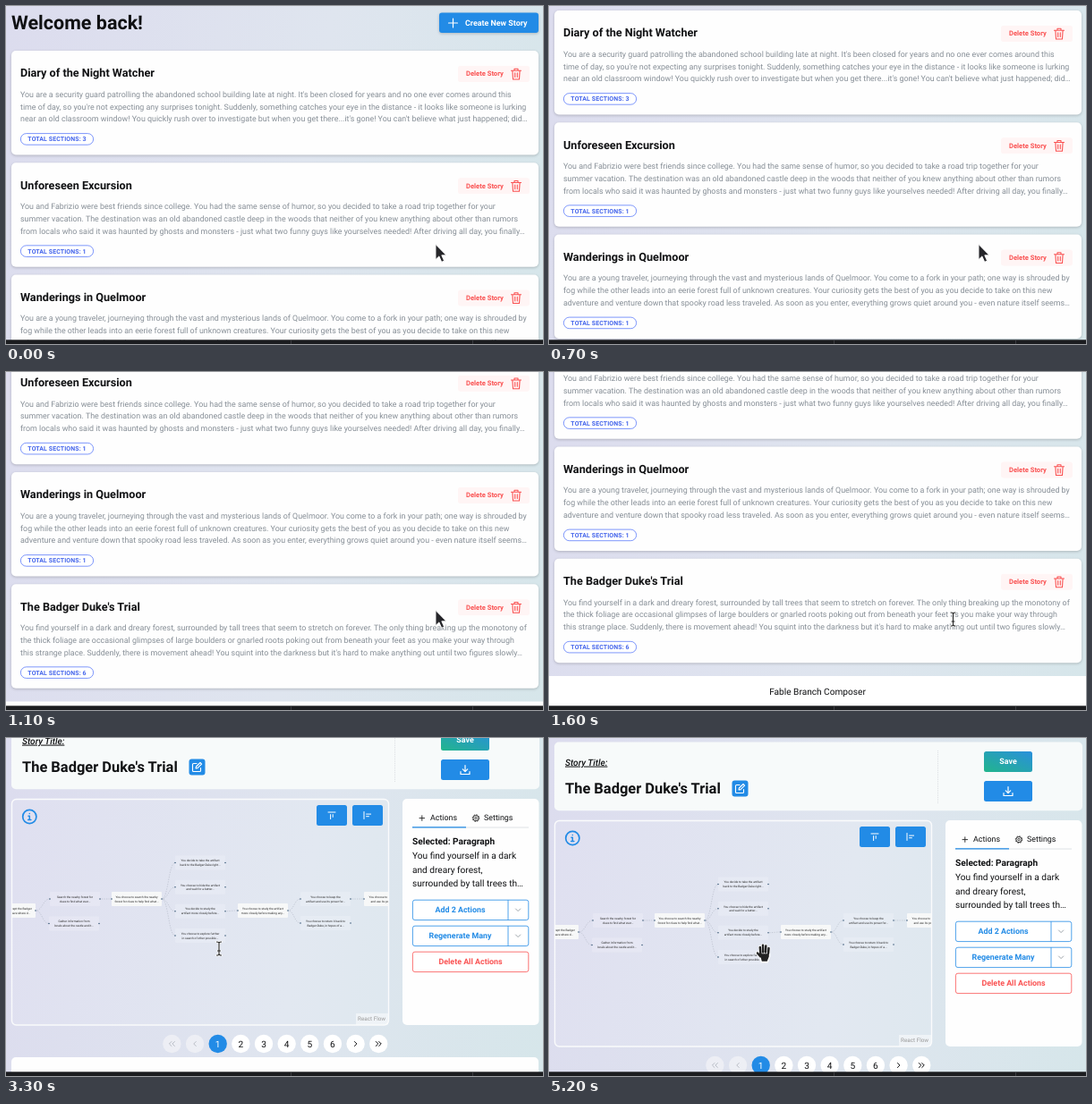
Write an HTML page that moves like this. It is 600 px wide and 378 px high and loops after 5300 ms.

```html
<!DOCTYPE html>
<html lang="en">
<head>
<meta charset="utf-8">
<title>Story editor</title>
<style>
html, body { margin: 0; width: 100%; height: 100%; overflow: hidden; }
svg { display: block; background: linear-gradient(100deg, #dcdcee, #dfe5ef 55%, #d6e6ea); }
text { font-family: Roboto, Arial, sans-serif; text-rendering: geometricPrecision; white-space: pre; }
.shadow { filter: drop-shadow(0 1px 1.5px #0003); }
.line { fill: none; stroke-linecap: round; stroke-linejoin: round; }
.bold { font-weight: 700; }
.mid { text-anchor: middle; }
.italic { font-style: italic; }
#edges { fill: none; stroke: #a0a6b4; stroke-width: .45; stroke-dasharray: 1.35; }
</style>
</head>
<body>
<svg width="600" height="378">
  <clipPath id="pane"><rect x="7" y="93" width="420" height="251"/></clipPath>
  <g id="list"></g>
  <g id="story"></g>
  <rect y="373.3" width="600" height="5" fill="#1b1c1f"/>
  <path d="M318.5 374v4M521.5 374v4" stroke="#3a3b3f"/>
  <g id="cursor"></g>
</svg>
<script>
const BLUE = '#228be6', RED = '#fa5252', GREY = '#868e96', INK = '#101113';
const SMALL = 8.88, BODY = 10.15;
const $ = id => document.getElementById(id);

// y is the middle of the capitals
const text = (x, y, s, size, cls = '', fill = INK, extra = '') =>
  `<text x="${x}" y="${y + size * .355}" font-size="${size}" class="${cls}" fill="${fill}" ${extra}>${s}</text>`;
const lines = (x, y, rows, size, pitch, fill, cls) =>
  rows.map((s, i) => text(x, y + i * pitch, s, size, cls, fill)).join('');
const rect = (x, y, w, h, r, fill, extra = '') =>
  `<rect x="${x}" y="${y}" width="${w}" height="${h}" rx="${r}" fill="${fill}" ${extra}/>`;
const icon = (x, y, d, color, width = 1.1) =>
  `<path class="line" transform="translate(${x} ${y})" d="${d}" stroke="${color}" stroke-width="${width}"/>`;

const TRASH = 'M0 2.5h11M3.5 2.5v-2h4v2M1.4 2.5l.6 9.8h7l.6-9.8M4.2 5v4.7M6.8 5v4.7';
const EDIT = 'M5 1.5H1.5a1 1 0 0 0-1 1v7a1 1 0 0 0 1 1h7a1 1 0 0 0 1-1V6.5M4 7l.4-2L9 .5l1.6 1.6L6 6.6z';

const stories = [
  ['Diary of the Night Watcher', 3,
    "You are a security guard patrolling the abandoned school building late at night. It's been closed for years and no one ever comes around this",
    "time of day, so you're not expecting any surprises tonight. Suddenly, something catches your eye in the distance - it looks like someone is lurking",
    "near an old classroom window! You quickly rush over to investigate but when you get there...it's gone! You can't believe what just happened; did…"],
  ['Unforeseen Excursion', 1,
    'You and Fabrizio were best friends since college. You had the same sense of humor, so you decided to take a road trip together for your',
    'summer vacation. The destination was an old abandoned castle deep in the woods that neither of you knew anything about other than rumors',
    'from locals who said it was haunted by ghosts and monsters - just what two funny guys like yourselves needed! After driving all day, you finally…'],
  ['Wanderings in Quelmoor', 1,
    'You are a young traveler, journeying through the vast and mysterious lands of Quelmoor. You come to a fork in your path; one way is shrouded by',
    'fog while the other leads into an eerie forest full of unknown creatures. Your curiosity gets the best of you as you decide to take on this new',
    'adventure and venture down that spooky road less traveled. As soon as you enter, everything grows quiet around you - even nature itself seems…'],
  ["The Badger Duke's Trial", 6,
    'You find yourself in a dark and dreary forest, surrounded by tall trees that seem to stretch on forever. The only thing breaking up the monotony of',
    'the thick foliage are occasional glimpses of large boulders or gnarled roots poking out from beneath your feet as you make your way through',
    "this strange place. Suddenly, there is movement ahead! You squint into the darkness but it's hard to make anything out until two figures slowly…"]
];

const card = ([title, count, ...rows], i) => `<g transform="translate(0 ${50 + i * 125.25})">
  ${rect(6, 0, 589, 116.5, 5, '#fefefe', 'class="shadow"')}
  ${text(16, 25, title, 12.66, 'bold')}
  ${rect(505, 17, 80, 18, 3, '#fff5f5')}
  ${text(514, 25.8, 'Delete Story', 7.6, 'bold', RED)}
  ${icon(564.5, 19.7, TRASH, RED)}
  ${lines(16, 48.6, rows, SMALL, 13.75, GREY)}
  ${rect(16.4, 92.6, 81.2, 12.6, 6.3, '#fff', 'stroke="#5c7cfa" stroke-width=".8"')}
  ${text(57, 98.9, 'TOTAL SECTIONS: ' + count, 6.95, 'bold mid', '#4263eb', 'letter-spacing=".12"')}</g>`;

$('list').innerHTML = text(6, 18.7, 'Welcome back!', 21.5, 'bold') +
  rect(484, 7.5, 111, 22.5, 3, BLUE, 'class="shadow"') +
  icon(494.5, 14, 'M0 5h10M5 0v10', '#fff', 1.2) +
  text(513, 18.6, 'Create New Story', SMALL, 'bold', '#fff') +
  stories.map(card).join('') +
  rect(0, 557, 600, 40, 0, '#fff') +
  text(300, 574.8, 'Fable Branch Composer', BODY, 'mid');

// centre x, centre y, two rows, white box
const nodes = [
  [5, 217, 'You choose to accept the Badger', 'Duke offer and leave where d...', 1],
  [77, 204, 'Search the nearby forest for', 'clues to find what ever...'],
  [76, 231.5, 'Gather information from', 'locals about the castle and it...'],
  [146, 204, 'You choose to search the nearby', 'forest for clues to help find what...', 1],
  [217, 163.5, 'You decide to take the artifact', 'back to the Badger-Duke right...'],
  [217, 190.8, 'You choose to hide the artifact', 'and wait for a better...'],
  [217, 217.7, 'You decide to study the', 'artifact more closely before...'],
  [217, 245, 'You choose to explore further', 'in search of other possible...'],
  [287, 217, 'You choose to study the artifact', 'more closely before making any...', 1],
  [357, 204, 'You choose to keep the', 'artifact and use its power for...'],
  [357, 231, 'You choose to return it back to', 'Badger-Duke, in hopes of a...'],
  [428, 204, 'You choose to keep the artifact', 'and use its power for good...', 1]
];
const links = [[0, 1], [0, 2], [1, 3], [3, 4], [3, 5], [3, 6], [3, 7], [6, 8], [8, 9], [8, 10], [9, 11]];
const HALF = 28;

const node = ([x, y, a, b, boxed]) =>
  rect(x - HALF, y - 8, 2 * HALF, 16, 1, boxed ? '#f7f8f8' : '#ffffff2c') +
  lines(x, y - 2.4, [a, b], 3.25, 4.9, '#222', 'mid') +
  [-HALF, HALF].map(d => `<circle cx="${x + d}" cy="${y}" r=".8" fill="#3f5f7c"/>`).join('');
const link = ([from, to]) => {
  const [ax, ay] = nodes[from], [bx, by] = nodes[to];
  const x1 = ax + HALF, x2 = bx - HALF, m = (x1 + x2) / 2;
  return `<path d="M${x1} ${ay}C${m} ${ay} ${m} ${by} ${x2} ${by}"/>`;
};

const splitButton = (y, label) =>
  rect(454.4, y, 129.4, 22.4, 2.5, '#fff', `stroke="${BLUE}" stroke-width=".8"`) +
  `<path d="M561 ${y}v22.4" stroke="${BLUE}" stroke-width=".8"/>` +
  text(507.5, y + 11.1, label, SMALL, 'bold mid', BLUE) +
  icon(569.5, y + 9.8, 'M0 0l2.6 2.6L5.2 0', GREY, .8);

const pages = ['«', '‹', 1, 2, 3, 4, 5, 6, '›', '»'];
const chevrons = {
  '«': 'M-.5-2.5L-3 0l2.5 2.5M3-2.5L.5 0 3 2.5', '‹': 'M1.2-2.5L-1.3 0l2.5 2.5',
  '›': 'M-1.2-2.5L1.3 0l-2.5 2.5', '»': 'M.5-2.5L3 0 .5 2.5M-3-2.5L-.5 0-3 2.5'
};
const pageDot = (p, i) => {
  const x = 185.4 + i * 25.65, on = p === 1, off = i < 2;
  return `<circle cx="${x}" cy="366" r="10.2" fill="${on ? BLUE : off ? '#f4f5f8aa' : '#fff'}"/>` +
    (chevrons[p] ? icon(x, 366, chevrons[p], off ? '#b9bec6' : INK, 1)
      : text(x, 366.1, p, BODY, 'mid', on ? '#fff' : INK));
};

const paragraph = [
  'You find yourself in a dark and dreary forest, surrounded by tall trees that seem to stretch on forever. The only thing',
  'breaking up the monotony of the thick foliage are occasional glimpses of large boulders or gnarled roots poking out',
  'from beneath your feet as you make your way through this strange place. Suddenly, there is movement ahead! You',
  "squint into the darkness but it's hard to make anything out until two figures slowly emerge from behind a bush –",
  "goblins! They're short and green with sharp teeth bared menacingly at you, ready for battle if need be. But before",
  'either one makes any move towards aggression they pause... then bow low in respect? It takes some time for it all',
  "sink in; these goblins aren't here to fight - instead they've been sent by their king who has heard about your legendary",
  'bravery and seeks an audience with you immediately. After exchanging words (and more bows) between yourselves',
  'an agreement is made: If successful completion of his task can be achieved he will reward generously indeed... With',
  'no other option available than to venture on towards an unknown peril, you set off without hesitation deeper'
];

const header = rect(6, 4.5, 590, 76.8, 5, '#f7fafa') +
  text(18, 27, 'Story Title:', BODY, 'italic', INK, 'font-weight="500" text-decoration="underline"') +
  text(18, 56.3, stories[3][0], 16.46, 'bold') +
  rect(204.5, 47.5, 18, 18, 3, BLUE) + icon(208, 51, EDIT, '#fff') +
  '<path d="M434.5 14v60" stroke="#d5d9dd" stroke-width=".8" stroke-dasharray="1 1"/>' +
  '<linearGradient id="save" x1="0" y1="1" x2="1" y2="0"><stop stop-color="#22b58c"/><stop offset="1" stop-color="#2a8fdc"/></linearGradient>' +
  rect(486, 15, 54, 23, 2.5, 'url(#save)') + text(513, 26.2, 'Save', SMALL, 'bold mid', '#fff') +
  rect(486, 48, 54, 23, 2.5, BLUE) +
  icon(508, 54.7, 'M0 7v2.8h10V7M5 0v6.8M2.3 4.2L5 6.9l2.7-2.7', '#fff', 1.2);

const graph = rect(6.5, 92.5, 421, 252.5, 5, '#ffffff18', 'stroke="#fafbfc" stroke-width="1.4"') +
  `<g clip-path="url(#pane)"><g id="edges">${links.map(link).join('')}</g>${nodes.map(node).join('')}</g>` +
  `<circle cx="26.3" cy="112" r="7.6" fill="none" stroke="${BLUE}" stroke-width="1.7"/>` +
  icon(26.3, 112, 'M0-3.6v.1M-1.3-.8H0v4M-1.6 3.4h3.2', BLUE, 1.5) +
  rect(347, 99, 34, 23, 2.5, BLUE) + icon(360, 107, 'M0 0h8M2.6 2.6v5M5.2 2.6v2.8', '#fff', 1) +
  rect(387, 99, 34, 23, 2.5, BLUE) + icon(400, 106.5, 'M0 0v8M2.6 2.6h5M2.6 5.2h2.8', '#fff', 1) +
  rect(391, 332, 36, 12.5, 0, '#ffffff80') + text(393, 338.2, 'React Flow', 6.33, '', '#999');

const cog = '<circle cx="525" cy="113.6" r="3.1" fill="none" stroke="#222" stroke-width=".9"/>' +
  '<circle cx="525" cy="113.6" r="1.2" fill="none" stroke="#222" stroke-width=".8"/>' +
  '<circle cx="525" cy="113.6" r="3.8" fill="none" stroke="#222" stroke-width=".9" stroke-dasharray="1.49"/>';
const panel = rect(443, 92, 152.5, 253, 5, '#fefefe') +
  icon(462, 110.8, 'M0 2.8h5.6M2.8 0v5.6', '#222', .9) + text(474, 113.3, 'Actions', SMALL) +
  cog + text(534, 113.3, 'Settings', SMALL) +
  `<path d="M454 124h130" stroke="#dee2e6"/><path d="M454 123.8h60" stroke="${BLUE}" stroke-width="1.3"/>` +
  text(454, 139.7, 'Selected: Paragraph', BODY, 'bold') +
  lines(454, 155.4, ['You find yourself in a dark', 'and dreary forest,', 'surrounded by tall trees th…'], BODY, 15.7, INK) +
  splitButton(205.2, 'Add 2 Actions') + splitButton(234.2, 'Regenerate Many') +
  rect(454.4, 263.2, 129.4, 22.4, 2.5, '#fff', `stroke="${RED}" stroke-width=".8"`) +
  text(519, 274.3, 'Delete All Actions', SMALL, 'bold mid', RED);

const section = rect(6, 381, 589, 300, 5, '#fefefe') +
  text(23, 409.6, 'Section 1', 16.5, 'bold') +
  text(23, 427.4, 'Section paragraph and list of actions.', SMALL, 'italic', GREY) +
  lines(23, 450.1, paragraph, BODY, 15.7, INK) + icon(563, 523.5, EDIT, GREY, 1.4);

$('story').innerHTML = header + graph + panel + pages.map(pageDot).join('') + section;

const fingers = 'M-3.6 2L-4.2-5.5M-.8 0L-1-7.8M2 0L2.3-7M5 1.5L5.5-4.4M-3.8 4.8L-7 1';
const beam = 'M-2.5-7.5Q0-7.5 0-6Q0-7.5 2.5-7.5M0-6V6M-2.5 7.5Q0 7.5 0 6Q0 7.5 2.5 7.5M-1.5 2.5h3';
const cursors = {
  arrow: '<path d="M0 0V17l3.9-3.6 2.8 6.4 2.9-1.2-2.8-6.3h5.2z" fill="#26262a" stroke="#fff" stroke-width=".9"/>',
  beam: icon(0, 0, beam, '#fff', 2.4) + icon(0, 0, beam, '#222', 1.1),
  hand: icon(0, 0, fingers, '#fff', 4) +
    '<path d="M-5.5 1H6.5V5L4.2 11H-2.7z" fill="#222" stroke="#fff" stroke-width="1.4" stroke-linejoin="round"/>' +
    icon(0, 0, fingers, '#222', 2.5)
};

// Linear interpolation through [time, value] keys
const track = (keys, t) => {
  const i = keys.findIndex(k => k[0] > t);
  if (i < 0) return keys[keys.length - 1][1];
  if (!i) return keys[0][1];
  const [t0, a] = keys[i - 1], [t1, b] = keys[i];
  return a + (b - a) * (t - t0) / (t1 - t0);
};

const listScroll = [[400, 0], [500, 4], [600, 19], [700, 45], [800, 82], [900, 122], [1000, 160], [1100, 188.5], [1200, 207], [1300, 217]];
const storyScroll = [[2700, 217], [2800, 205], [2900, 176], [3000, 138], [3200, 55], [3300, 24], [3400, 7], [3500, 0]];
const cursorX = [[1400, 480], [1500, 479], [1600, 451.5], [1700, 400], [1800, 335], [1900, 279], [2000, 249], [2300, 237.5], [2600, 238], [3400, 238], [3500, 240]];
const cursorY = [[1400, 266.5], [1500, 281], [1600, 276.5], [2000, 269], [2100, 262], [2200, 247], [2300, 234.5], [2600, 235.5], [3400, 235.5], [3500, 239.5]];
const shape = t => t < 1500 ? 'arrow' : t < 2300 ? 'beam' : t < 2600 ? 'arrow' : t < 3500 ? 'beam' : 'hand';

function draw(now) {
  const t = Math.floor(now % 5300 / 100) * 100; // ten pictures a second
  const inStory = t >= 2500;
  $('list').style.display = inStory ? 'none' : '';
  $('story').style.display = inStory ? '' : 'none';
  $('list').setAttribute('transform', `translate(0 ${-track(listScroll, t)})`);
  $('story').setAttribute('transform', `translate(0 ${-track(storyScroll, t)})`);
  $('edges').setAttribute('stroke-dashoffset', -t / 500 * 2.7);
  $('cursor').innerHTML = cursors[shape(t)];
  $('cursor').setAttribute('transform', `translate(${track(cursorX, t)} ${track(cursorY, t)})`);
}
const start = performance.now();
const tick = () => { draw(performance.now() - start); requestAnimationFrame(tick); };
tick();
</script>
</body>
</html>
```
